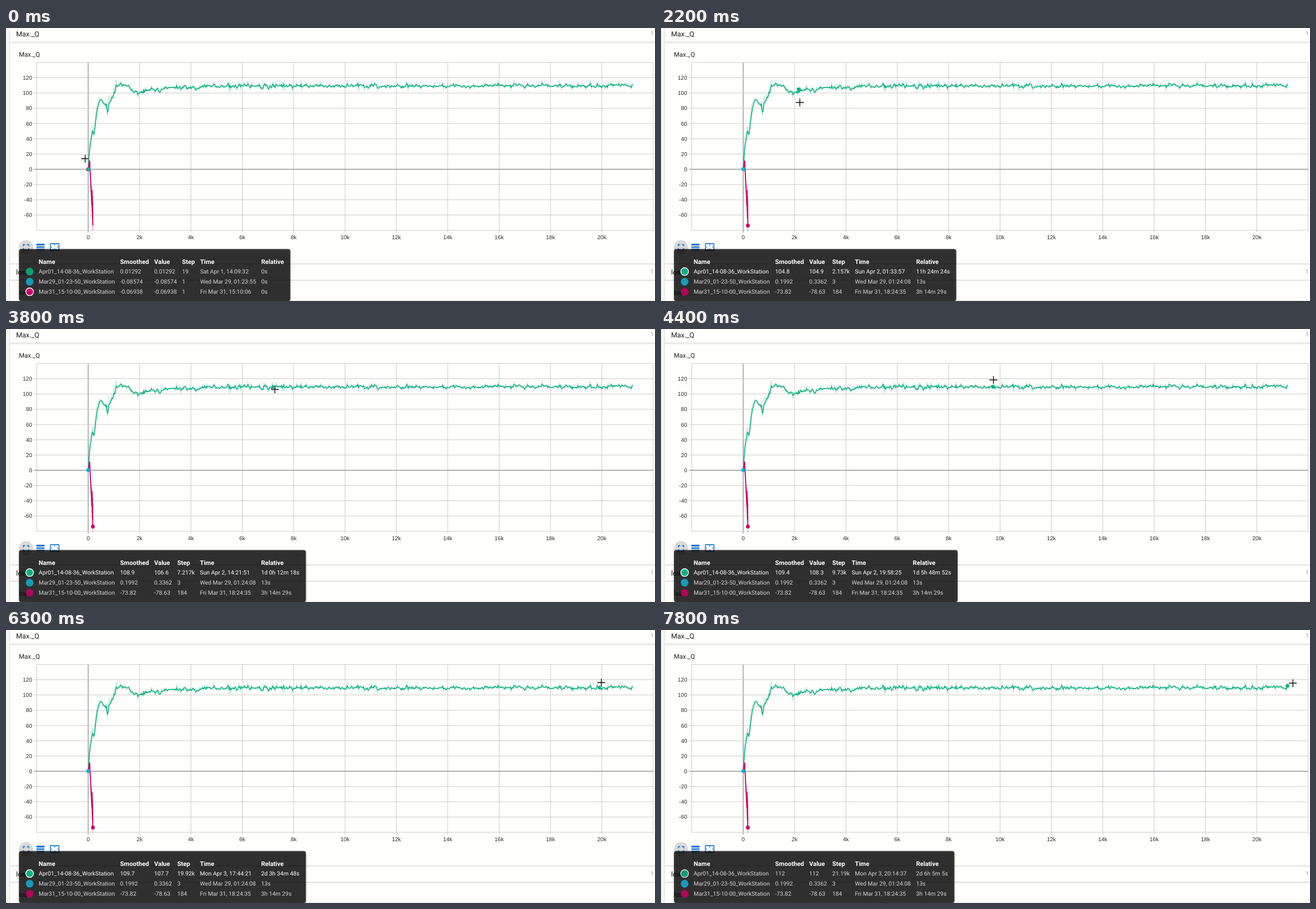
Write an HTML page that moves like this. It is 1153 px wide and 486 px high and loops after 8000 ms.

```html
<!DOCTYPE html>
<html lang="en">
<head>
<meta charset="utf-8">
<title>Training chart</title>
<style>
  html, body { margin: 0; width: 100%; height: 100%; overflow: hidden; background: #f5f5f4; }
  svg { display: block; font-family: Roboto, "Open Sans", sans-serif; text-rendering: geometricPrecision; }
  .axis { font: 10px "Liberation Sans", Arial, sans-serif; fill: #2b2b2b; }
  .head { font-size: 12.4px; fill: #1c1c1c; }
  .title { font-size: 11.2px; fill: #1c1c1c; }
  .count { font-size: 10px; fill: #999; }
  .th { font-size: 11.1px; font-weight: 700; fill: #fff; }
  .td { font-size: 10.3px; fill: #fff; }
  .line { fill: none; stroke-linejoin: round; }
  .panel { fill: rgba(0, 0, 0, .76); filter: drop-shadow(0 1px 2px rgba(0, 0, 0, .3)); }
</style>
</head>
<body>
<svg id="stage" width="1153" height="486" viewBox="0 0 1153 486"></svg>
<script>
const LOOP = 8000, TICK = 100;
const LEAVE = 6800, RETURN = 7800;
const GREEN = '#10b183', CYAN = '#14b0d3', PINK = '#cb0066', BLUE = '#1976d2';
const X0 = 146, Y0 = 251.5, PX_STEP = 0.04563, PX_VAL = 1.358;
const xOf = step => X0 + step * PX_STEP;
const yOf = value => Y0 - value * PX_VAL;
const stepAt = x => (x - X0) / PX_STEP;

const stage = document.getElementById('stage');
function set(el, attrs) {
  for (const k in attrs) el.setAttribute(k, attrs[k]);
}
function add(parent, tag, attrs, text) {
  const el = document.createElementNS('http://www.w3.org/2000/svg', tag);
  set(el, attrs);
  if (text !== undefined) el.textContent = text;
  parent.appendChild(el);
  return el;
}
const rect = (x, y, width, height, fill) => add(stage, 'rect', { x, y, width, height, fill });
const label = (cls, x, y, text, anchor = 'start') =>
  add(stage, 'text', { class: cls, x, y, 'text-anchor': anchor }, text);
const path = (parent, d, attrs) => add(parent, 'path', { d, fill: 'none', ...attrs });

// Linear interpolation through rows whose first entry is the key
function lerpRows(rows, key) {
  const i = rows.findIndex(r => r[0] >= key);
  if (i < 0) return rows[rows.length - 1];
  if (i === 0) return rows[0];
  const a = rows[i - 1], b = rows[i], k = (key - a[0]) / (b[0] - a[0]);
  return a.map((v, j) => v + (b[j] - v) * k);
}

let seed = 41;
function random() {
  seed = (seed * 16807) % 2147483647;
  return seed / 2147483647;
}

// [step, value] points become [step, smoothed, raw]; raw undoes the smoothing
const withRaw = (points, gain) => points.map(([s, v], i) =>
  [s, v, v + gain * (v - points[Math.max(0, i - 1)][1])]);

// Records shown in the tooltip: step, smoothed, raw, elapsed seconds
const records = [
  [19, 0.01292, 0.01292, 0], [715, 85.05, 88.68, 18742.5], [2157, 104.8, 104.9, 41064.5],
  [7217, 108.9, 106.6, 87138.5], [12220, 109.2, 109.9, 127334.5],
  [19920, 109.7, 107.7, 185688.5], [21190, 112, 112, 194705]
];
// Green trend: climb, dip, overshoot, plateau
const trend = [
  [0, 0], [66, 29], [170, 49], [230, 44], [350, 80], [470, 92], [680, 86], [760, 73], [810, 87],
  [960, 94], [1100, 109], [1450, 110], [1950, 99.5], [2160, 103], [3400, 107.5], [6000, 109], [21190, 109.7]
];

function greenRows() {
  const points = [];
  let drift = 0;
  for (let s = 0; s < 21170; s += 28) {
    const r = random() * 2 - 1;
    drift = 0.5 * drift + 1.2 * r + 2.2 * r ** 7;
    points.push([s, lerpRows(trend, s)[1] + drift * Math.min(1, s / 400)]);
  }
  return withRaw(points, 1.1)
    .concat(records.map(r => r.slice(0, 3)))
    .sort((a, b) => a[0] - b[0]);
}

// Pink run: short rise, then a fall that jitters near its end
function pinkRows() {
  const points = [];
  for (let s = 1, i = 0; s < 184; s += 6, i++) {
    const rise = (s - 1) / 56 * 11.4, fall = 11.4 - 85.2 * (s - 57) / 127;
    const jitter = s > 148 && i % 2 ? 24 : 0;
    points.push([s, Math.min(rise, fall) - 0.06938 + jitter]);
  }
  return withRaw(points, 0.3).concat([[184, -73.82, -78.63]]);
}
const green = greenRows(), pink = pinkRows();
const trace = (rows, col) => 'M' + rows.map(r => xOf(r[0]).toFixed(2) + ' ' + yOf(r[col]).toFixed(2)).join('L');

// Page cards
function card(y, h) {
  rect(6, y, 1150, h, '#e2e2e1');
  rect(7, y + 1, 1150, h - 2, '#fffffd');
}
card(-4, 29);
card(26, 394);
card(420, 29);
card(449, 50);
label('head', 18, 15, 'Max._Q');
label('count', 1145, 13, '1');
label('title', 23, 51, 'Max._Q');
label('head', 18, 438.5, 'loss');
label('count', 1145, 437, '1');
label('title', 23, 474.5, 'loss');
path(stage, 'M54 485.5H1150', { stroke: '#dedede' });

// Grid and axes
const gridStyle = zero => ({ stroke: zero ? '#969696' : '#cbcbcb', 'stroke-width': zero ? 1.4 : 1 });
for (let s = -2; s <= 22; s += 2) {
  const x = xOf(s * 1000);
  path(stage, `M${x} 62V${s < 0 ? 360.5 : 364}`, gridStyle(s === 0));
  if (s >= 0 && s < 22) label('axis', x, 375.6, s ? s + 'k' : '0', 'middle');
}
for (let v = -80; v <= 140; v += 20) {
  const y = yOf(v), edge = v === -80 || v === 140;
  path(stage, `M${edge ? 54 : 50} ${y}H1150`, gridStyle(v === 0));
  if (!edge) label('axis', 46.5, y + 3.5, v, 'end');
}

// Curves
function curve(rows, color, width) {
  path(stage, trace(rows, 2), { class: 'line', stroke: color, 'stroke-width': width, opacity: 0.25 });
  path(stage, trace(rows, 1), { class: 'line', stroke: color, 'stroke-width': width });
}
curve(green, GREEN, 1.6);
curve(pink, PINK, 1.8);

// Toolbar
const icon = (x, scale, d) => path(stage, d, { fill: BLUE, transform: `translate(${x} 380.8) scale(${scale})` });
add(stage, 'circle', { cx: 35.5, cy: 390, r: 12.5, fill: '#dadad9' });
icon(26, 0.8, 'M7 14H5v5h5v-2H7zM5 10h2V7h3V5H5zM17 17h-3v2h5v-5h-2zM14 5v2h3v3h2V5z');
icon(51.6, 0.8, 'M3 4h18v4H3zM3 10h18v3H3zM3 15h18v2H3zM3 19h18v1H3z');
icon(77.2, 0.77, 'M12 5.5L10 8h4zM18 10v4l2.5-2zM6 10l-2.5 2L6 14zM14 16h-4l2 2.5z' +
  'M21 3H3q-2 0-2 2v14q0 2 2 2h18q2 0 2-2V5q0-2-2-2zm0 16H3V5h18z');

// Hover layer: markers, tooltip, cursor
const hover = add(stage, 'g', {});
const dot = color => add(hover, 'circle', { r: 3.4, fill: color });
const dots = { cyan: dot(CYAN), pink: dot(PINK), green: dot(GREEN) };
const panel = add(hover, 'rect', { class: 'panel', x: 23, y: 393.6, height: 92.4, rx: 4 });

const HEADERS = ['Name', 'Smoothed', 'Value', 'Step', 'Time', 'Relative'];
const cells = (parent, cls, y) => HEADERS.map(() => add(parent, 'text', { class: cls, y }));
const headCells = cells(hover, 'th', 420.2);
headCells.forEach((c, i) => { c.textContent = HEADERS[i]; });
const rows = [GREEN, CYAN, PINK].map((fill, i) => {
  const y = 433.6 + i * 18;
  const bullet = add(hover, 'circle', { cx: 42, cy: y, r: 6.8, fill, 'stroke-width': 1.4 });
  const text = add(hover, 'g', {});
  return { bullet, text, cells: cells(text, 'td', y + 3.8) };
});
const cursor = add(hover, 'g', {});
const PLUS = 'M-7 0H7M0 -7V7';
path(cursor, PLUS, { stroke: '#fff', 'stroke-width': 3, 'stroke-linecap': 'square', opacity: 0.7 });
path(cursor, PLUS, { stroke: '#777', 'stroke-width': 1.2, opacity: 0.35, transform: 'translate(1 1)' });
path(cursor, PLUS, { stroke: '#151515', 'stroke-width': 1.3 });

// Text formats
const num = v => String(Number(v.toPrecision(4)));
const stepText = s => s < 1000 ? String(Math.round(s)) : num(s / 1000) + 'k';
function spanText(sec) {
  const s = Math.floor(sec);
  const parts = [[Math.floor(s / 86400), 'd'], [Math.floor(s / 3600) % 24, 'h'], [Math.floor(s / 60) % 60, 'm'], [s % 60, 's']];
  while (parts.length > 1 && !parts[0][0]) parts.shift();
  return parts.map(p => p.join('')).join(' ');
}
const DAYS = 'Sun Mon Tue Wed Thu Fri Sat'.split(' ');
function timeText(start, sec) {
  const d = new Date(Date.parse(start) + sec * 1000);
  const month = d.getUTCMonth() === 2 ? 'Mar' : 'Apr';
  return `${DAYS[d.getUTCDay()]} ${month} ${d.getUTCDate()}, ${d.toISOString().slice(11, 19)}`;
}
const record = (name, start, smoothed, raw, step, sec) =>
  [name + '_WorkStation', num(smoothed), num(raw), stepText(step), timeText(start, sec), spanText(sec)];

// Pointer legs: start, end, x, y; long legs bow upwards
const HOME = [140, 232];
const legs = [
  [400, 1200, 178, 184], [1200, 2200, 246, 132], [2200, 2800, 316, 134], [2900, 3000, 337, 136],
  [3300, 3800, 477, 107], [3800, 5000, 703, 84], [5300, 6300, 1057, 93], [6300, 6700, 1122, 94]
];
function pointerAt(t) {
  let [x, y] = HOME;
  for (const [from, to, nx, ny] of legs) {
    const k = Math.min(1, Math.max(0, (t - from) / (to - from)));
    const bow = 0.025 * (nx - x) * Math.sin(Math.PI * k);
    x += (nx - x) * k;
    y += (ny - y) * k - bow;
    if (k < 1) break;
  }
  return [x, y];
}

// The hovered step sticks to a record close to the pointer
function hoveredStep(x) {
  const step = Math.min(21190, Math.max(19, stepAt(x)));
  const near = records.find(r => Math.abs(r[0] - step) < 50);
  return near ? near[0] : step;
}

const ctx = document.createElement('canvas').getContext('2d');
function widthOf(text, font) {
  ctx.font = font + ' Roboto, "Open Sans", sans-serif';
  return ctx.measureText(text).width;
}

function layout(table) {
  let x = 58;
  HEADERS.forEach((h, i) => {
    let w = widthOf(h, '700 11.1px');
    headCells[i].setAttribute('x', x);
    rows.forEach((r, j) => {
      r.cells[i].setAttribute('x', x);
      r.cells[i].textContent = table[j][i];
      w = Math.max(w, widthOf(table[j][i], '10.3px'));
    });
    x += w + 9.3;
  });
  panel.setAttribute('width', x + 2.2 - 23);
}

const place = (el, step, value) => set(el, { cx: xOf(step), cy: yOf(value) });

function draw(t) {
  const visible = t < LEAVE || t >= RETURN;
  hover.setAttribute('display', visible ? 'inline' : 'none');
  if (!visible) return;

  const [x, y] = pointerAt(t);
  cursor.setAttribute('transform', `translate(${Math.round(x) + 0.5} ${Math.round(y) + 0.5})`);

  const step = hoveredStep(x);
  const [, gs, gv] = lerpRows(green, step);
  const gSec = lerpRows(records, step)[3];
  const atStart = step < 20;
  const [cs, cv, cStep, cSec] = atStart ? [-0.08574, -0.08574, 1, 0] : [0.1992, 0.3362, 3, 13];
  const pStep = atStart ? 1 : Math.min(184, step);
  const [, ps, pv] = lerpRows(pink, pStep);
  const pSec = 11669 * (pStep - 1) / 183;

  place(dots.green, step, gs);
  place(dots.cyan, cStep, cs);
  place(dots.pink, pStep, ps);

  layout([
    record('Apr01_14-08-36', '2023-04-01T14:09:32.6Z', gs, gv, step, gSec),
    record('Mar29_01-23-50', '2023-03-29T01:23:55Z', cs, cv, cStep, cSec),
    record('Mar31_15-10-00', '2023-03-31T15:10:06Z', ps, pv, pStep, pSec)
  ]);

  const active = t < 700 ? 2 : 0;
  const bright = t >= 700 && t < RETURN;
  rows.forEach((r, i) => {
    const on = i === active;
    r.text.setAttribute('opacity', on && bright ? 1 : 0.8);
    set(r.bullet, { stroke: on ? '#fff' : 'none', opacity: on && t < RETURN ? 1 : 0.84 });
  });
}

let last = -1;
const begin = performance.now();
function loop(now) {
  const t = Math.floor((Math.max(0, now - begin) % LOOP) / TICK) * TICK;
  if (t !== last) draw(last = t);
  requestAnimationFrame(loop);
}
requestAnimationFrame(loop);
</script>
</body>
</html>
```
